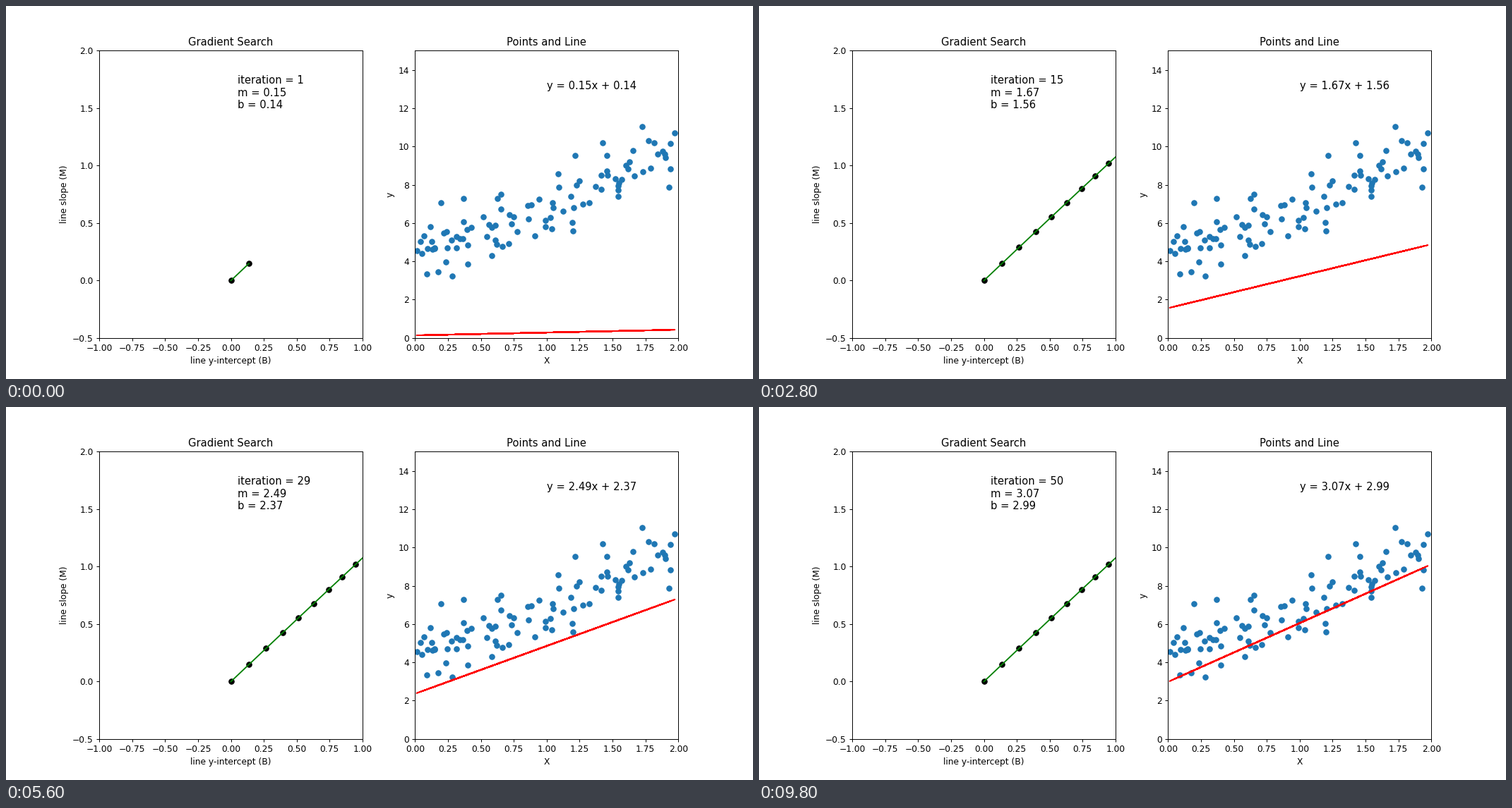
Write a matplotlib script that moves like this. It is 1058 px wide and 529 px high and loops after 10000 ms.

```python
import matplotlib.pyplot as plt
import numpy as np
from matplotlib.animation import FuncAnimation

STEPS = 50
RATE = 0.01

# Noisy samples around y = 3x + 4
np.random.seed(42)
x = 2 * np.random.rand(100)
y = 4 + 3 * x + np.random.randn(100)


def descend(steps):
    """Return every (b, m) visited by gradient descent, starting at zero."""
    path = np.zeros((steps + 1, 2))
    for i in range(steps):
        b, m = path[i]
        error = y - (m * x + b)
        path[i + 1] = path[i] + 2 * RATE * np.array([error.mean(), (error * x).mean()])
    return path


path = descend(STEPS)

fig, (search, fit) = plt.subplots(1, 2, figsize=(12, 6), dpi=1058 / 12)

search.set(title="Gradient Search", xlim=(-1, 1), ylim=(-0.5, 2),
           xlabel="line y-intercept (B)", ylabel="line slope (M)")
dots = search.scatter([], [], color="black")
trail, = search.plot([], [], "g-")
status = search.text(0.05, 1.5, "", fontsize=12)

fit.set(title="Points and Line", xlim=(0, 2), ylim=(0, 15), xlabel="X", ylabel="y")
fit.scatter(x, y)
# Samples stay unsorted, so the line runs back and forth over itself
line, = fit.plot([], [], "r-")
formula = fit.text(1, 13, "", fontsize=12)


def update(frame):
    step = frame + 1
    b, m = path[step]
    visited = path[:step + 1]
    dots.set_offsets(visited)
    trail.set_data(visited[:, 0], visited[:, 1])
    line.set_data(x, m * x + b)
    status.set_text(f"iteration = {step}\nm = {m:.2f}\nb = {b:.2f}")
    formula.set_text(f"y = {m:.2f}x + {b:.2f}")
    return dots, trail, line, status, formula


anim = FuncAnimation(fig, update, frames=STEPS, interval=200, repeat=True,
                     repeat_delay=0)
plt.show()
```
